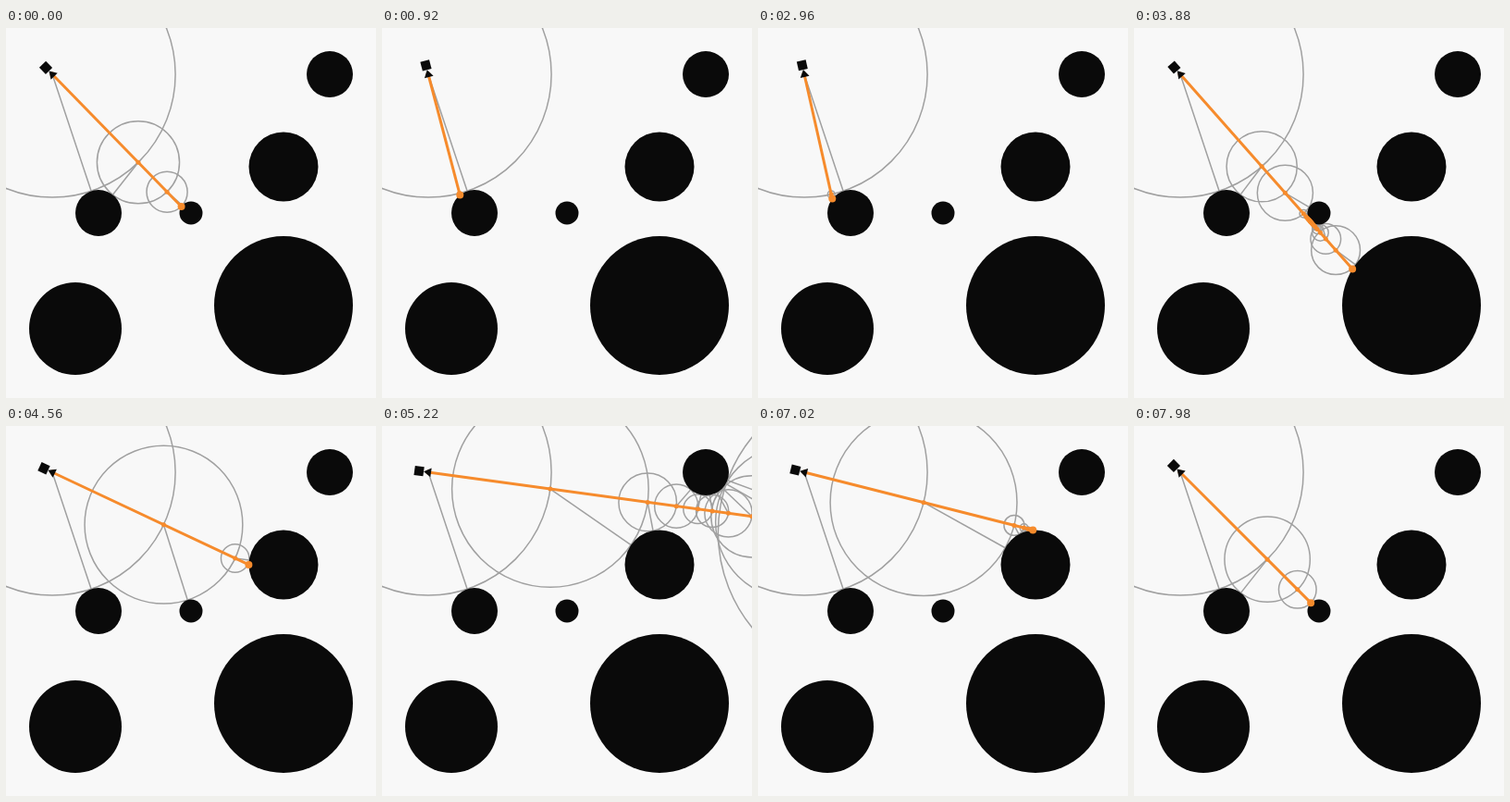
An HTML page with a canvas for the animation above (8 s loop, 400 px wide and 400 px high).

```html
<!DOCTYPE html>
<html lang="en">
<head>
<meta charset="utf-8">
<title>Sphere tracing</title>
<style>
  html, body { margin: 0; width: 100%; height: 100%; overflow: hidden; background: #f8f8f8; }
  canvas { display: block; width: 400px; height: 400px; }
</style>
</head>
<body>
<canvas id="stage"></canvas>
<script>
const SIZE = 400, LOOP = 8000, STEP = 20;
const MAX_DIST = 600, HIT = 0.1, MAX_STEPS = 300;
const INK = '#0a0a0a', GRAY = '#a0a0a0', RAY = '#f68b2c', PAPER = '#f8f8f8';
const eye = { x: 50, y: 50 };

const discs = [
  [100, 200, 25], [200, 200, 12.5], [75, 325, 50],
  [300, 300, 75], [300, 150, 37.5], [350, 50, 25]
].map(([x, y, r]) => ({ x, y, r }));

const canvas = document.getElementById('stage');
const ctx = canvas.getContext('2d');
const scale = window.devicePixelRatio || 1;
canvas.width = canvas.height = SIZE * scale;

function circlePath(x, y, r) {
  ctx.beginPath();
  ctx.arc(x, y, r, 0, Math.PI * 2);
}

function dot(p, r, color) {
  ctx.fillStyle = color;
  circlePath(p.x, p.y, r);
  ctx.fill();
}

function line(a, b, color, width) {
  ctx.strokeStyle = color;
  ctx.lineWidth = width;
  ctx.beginPath();
  ctx.moveTo(a.x, a.y);
  ctx.lineTo(b.x, b.y);
  ctx.stroke();
}

// Distance to the closest disc and the point on its edge.
function nearest(p) {
  let best = { dist: Infinity };
  for (const disc of discs) {
    const dx = disc.x - p.x, dy = disc.y - p.y;
    const len = Math.hypot(dx, dy), dist = len - disc.r;
    if (dist < best.dist) {
      best = { dist, edge: { x: p.x + dx * dist / len, y: p.y + dy * dist / len } };
    }
  }
  return best;
}

function march(angle) {
  const at = d => ({ x: eye.x + d * Math.cos(angle), y: eye.y + d * Math.sin(angle) });
  const steps = [];
  let travelled = 0;
  while (travelled < MAX_DIST && steps.length < MAX_STEPS) {
    const p = at(travelled);
    const { dist, edge } = nearest(p);
    if (dist < HIT) break;
    steps.push({ p, dist, edge });
    travelled += dist;
  }
  return { steps, end: at(travelled) };
}

function drawCamera(angle) {
  ctx.save();
  ctx.translate(eye.x, eye.y);
  ctx.rotate(angle);
  ctx.fillStyle = INK;
  ctx.fillRect(-15, -5, 10, 10);
  ctx.beginPath();
  ctx.moveTo(-5, 0);
  ctx.lineTo(3, -5);
  ctx.lineTo(3, 5);
  ctx.fill();
  ctx.restore();
}

function draw(time) {
  const angle = Math.PI / 4 * (1 + Math.sin(time / LOOP * Math.PI * 2));
  const { steps, end } = march(angle);

  ctx.setTransform(scale, 0, 0, scale, 0, 0);
  ctx.fillStyle = PAPER;
  ctx.fillRect(0, 0, SIZE, SIZE);

  for (const { p, dist, edge } of steps) {
    line(p, edge, GRAY, 1.5);
    circlePath(p.x, p.y, dist);
    ctx.stroke();
  }
  for (const disc of discs) dot(disc, disc.r, INK);

  line(eye, end, RAY, 3);
  for (const { p } of steps) dot(p, 2.5, RAY);
  dot(end, 4, RAY);
  drawCamera(angle);
}

function tick() {
  const frame = Math.floor((performance.now() % LOOP + 0.5) / STEP);
  draw((frame + 1) * STEP);
  requestAnimationFrame(tick);
}
tick();
</script>
</body>
</html>
```
